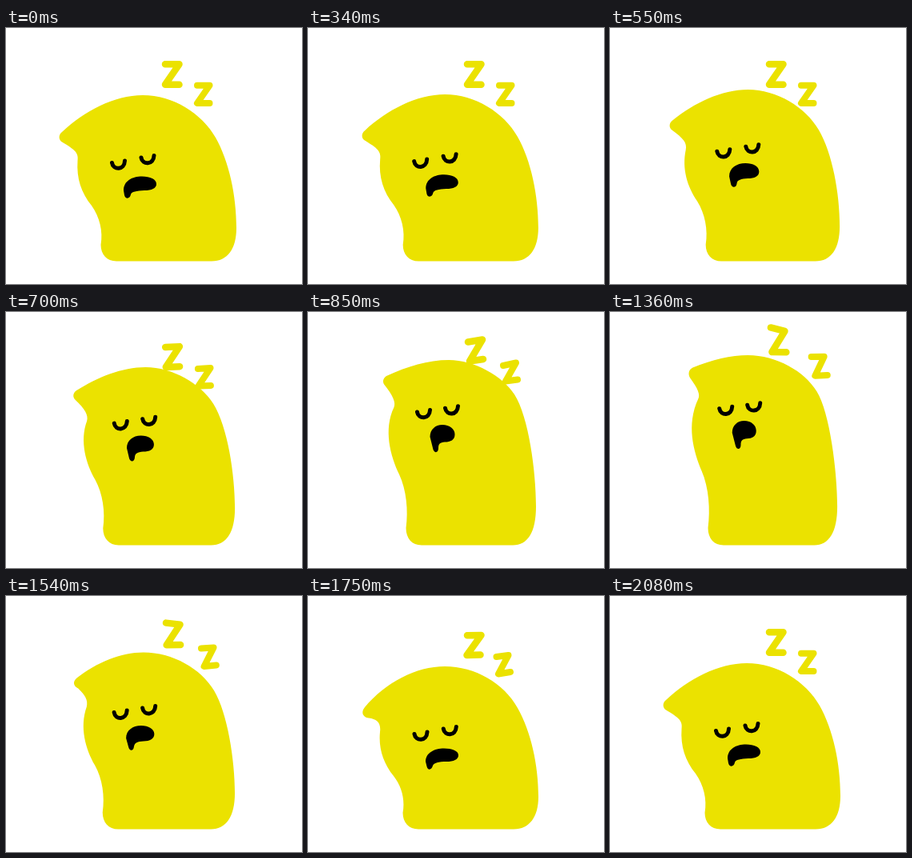
Write an HTML page that moves like this. It is 370 px wide and 320 px high and loops after 2.29 s.

```html
<!DOCTYPE html>
<html lang="en">
<head>
<meta charset="utf-8">
<title>Sleepy blob</title>
<style>
  html, body { margin: 0; width: 100%; height: 100%; overflow: hidden; background: #fff; }
  svg { display: block; width: 370px; height: 320px; }
  path { stroke-linecap: round; stroke-linejoin: round; }
  .body { fill: #ebe200; }
  .z { fill: none; stroke: #ebe200; }
  .eyes { fill: none; stroke: #000; stroke-width: 5; }
</style>
</head>
<body>
<svg viewBox="0 0 370 320">
  <path id="body" class="body"/>
  <path id="eyes" class="eyes"/>
  <path id="mouth"/>
  <path id="bigZ" class="z" stroke-width="8.5"/>
  <path id="smallZ" class="z" stroke-width="8"/>
</svg>
<script>
const LOOP = 2290, START = 280, END = 2080, STEP = 30;

const numbers = d => d.match(/-?[\d.]+/g).map(Number);
const mix = (a, b, k) => a.map((v, i) => v + (b[i] - v) * k);

const eyePath = (x, y) => `M${x} ${y}c1.5 9.5 15.5 9.5 16 -2.5`;
const eyes = (x1, y1, x2, y2) => eyePath(x1, y1) + eyePath(x2, y2);
const zed = (...p) => `M${p[0]} ${p[1]}L${p[2]} ${p[3]}L${p[4]} ${p[5]}L${p[6]} ${p[7]}`;

// Poses in order: rest, rising, full breath, slump
const body = [
  `M138 291.5C126 291.5 118.5 283 118.5 271C121.5 254 117 236 107 222C94 206 88 188 89.5 166
   C91 156 86 152 70 142.5C66 140 65 134 70 130C98 104 135 84 171 84C209 84 245 107 262 137
   C279 167 288 210 288 250C288 276 277 291.5 257 291.5Z`,
  `M142 291.5C130 291.5 122.5 283 122.5 270C125.5 248 123 222 114 203C103 180 94 147 107.5 119
   C110 113 106 104 95.5 91C93 87.5 93.5 83 98 80C124 68 150 60 176 60C208 60 243 80 258 103
   C276 131 285 200 285 243C285 275 275 291.5 256 291.5Z`,
  `M142 291.5C130 291.5 122.5 283 122.5 270C125.5 246 124 218 115 196C105 170 96 137 112 102
   C115 97 113 91 103 76.5C100.5 71 101 65 107 62.5C130 54 152 50 170 50C208 50 243 70 259 97
   C274 122 283.5 200 283.5 243C283.5 275 273 291.5 255 291.5Z`,
  `M138 291.5C126 291.5 118.5 283 118.5 271C121.5 254 117 238 107 225C94 209 88 190 90 170
   C91.5 158 86 154 76 152.5C68 151.5 66 145 71 139C97 108 135 88 171 88C209 88 245 109 262 140
   C279 170 288 212 288 251C288 276 277 291.5 257 291.5Z`
];

const mouth = [
  `M147 203C147 191 158 185.5 170 185.5C180 185.5 188 189 188 195C188 200.5 182 203 173 203
   C163 203.5 157 204.5 156 208C155 214 149 214 148 209Z`,
  `M152.5 156C152.5 147 159 141 168 141C177 141 183.5 146 183.5 153C183.5 160 178 162.5 171 162.5
   C165 163 163 165 163 170C163 176.5 158 176.5 156.5 172Z`,
  `M153 146C153 137 159 131 167.5 131C176 131 182 137 182 144C182 151 177 154 171 154
   C166 154.5 164 156 164 162C164 168.5 159 168.5 157.5 163Z`,
  `M147 207C147 196 158 190.5 170 190.5C180 190.5 188 193.5 188 199C188 204.5 182 207 173 207
   C163 207 157.5 208.5 156 212C154.5 218 149.5 218 148.5 213Z`
];

const eyePoses = [
  eyes(132.5, 168.5, 169, 162),
  eyes(136.5, 125, 171.5, 120.2),
  eyes(137, 115.5, 172, 111.5),
  eyes(133, 172.5, 169.3, 166)
];

const bigZ = [
  zed(199, 45.3, 216.5, 45.3, 199, 70.7, 216.5, 70.7),
  zed(200, 37.5, 218, 34.5, 202, 61.5, 219, 59),
  zed(201, 17, 218.5, 22.5, 202.5, 48.5, 220.5, 49),
  zed(199, 49.3, 216.5, 49, 198.5, 74, 215.5, 73.5)
];

const smallZ = [
  zed(239, 71.7, 254.5, 71.7, 239, 94, 254.5, 94),
  zed(244, 67, 260, 63.5, 247, 86.5, 262, 84.5),
  zed(253, 54, 269, 54.5, 258, 78.5, 273.5, 78),
  zed(235.5, 76, 250.5, 74, 238, 97.5, 253, 95)
];

// early: share of the rise reached at earlyTime; sink: share of the way back from full to rising
function track(id, poses, earlyTime, early, sink) {
  const [rest, rising, full, slump] = poses.map(numbers);
  return {
    el: document.getElementById(id),
    gaps: poses[0].split(/-?[\d.]+/),
    times: [START - STEP, earlyTime, 850, 1120, 1360, 1750, 1900, END],
    keys: [rest, mix(rest, rising, early), rising, full, mix(full, rising, sink),
           slump, mix(slump, rest, 0.82), rest]
  };
}

const tracks = [
  track("body", body, 550, 0.29, 0.4),
  track("eyes", eyePoses, 550, 0.33, 0.55),
  track("mouth", mouth, 550, 0.37, 0.5),
  track("bigZ", bigZ, 620, 0, 0.12),
  track("smallZ", smallZ, 620, 0, 0.15)
];

// Smooth curve through the keys that never overshoots them
function valueAt({ times, keys }, n, i, t) {
  const slope = k => (keys[k + 1][i] - keys[k][i]) / (times[k + 1] - times[k]);
  const tangent = k => {
    if (k === 0 || k === times.length - 1) return 0;
    const a = slope(k - 1), b = slope(k);
    return a * b > 0 ? 2 * a * b / (a + b) : 0;
  };
  const h = times[n + 1] - times[n], u = (t - times[n]) / h;
  const p = keys[n][i], q = keys[n + 1][i];
  const s = u * u * (3 - 2 * u);
  return p + (q - p) * s
    + h * u * (1 - u) * ((1 - u) * tangent(n) - u * tangent(n + 1));
}

function draw(time) {
  const t = time < START || time >= END
    ? END
    : START + Math.floor((time - START) / STEP) * STEP;
  for (const tr of tracks) {
    let n = 0;
    while (n < tr.times.length - 2 && t >= tr.times[n + 1]) n++;
    tr.el.setAttribute("d", tr.gaps.reduce((d, gap, i) =>
      d + valueAt(tr, n, i - 1, t).toFixed(2) + gap));
  }
}

const begin = performance.now();
function tick() {
  draw((performance.now() - begin) % LOOP);
  requestAnimationFrame(tick);
}
tick();
</script>
</body>
</html>
```
